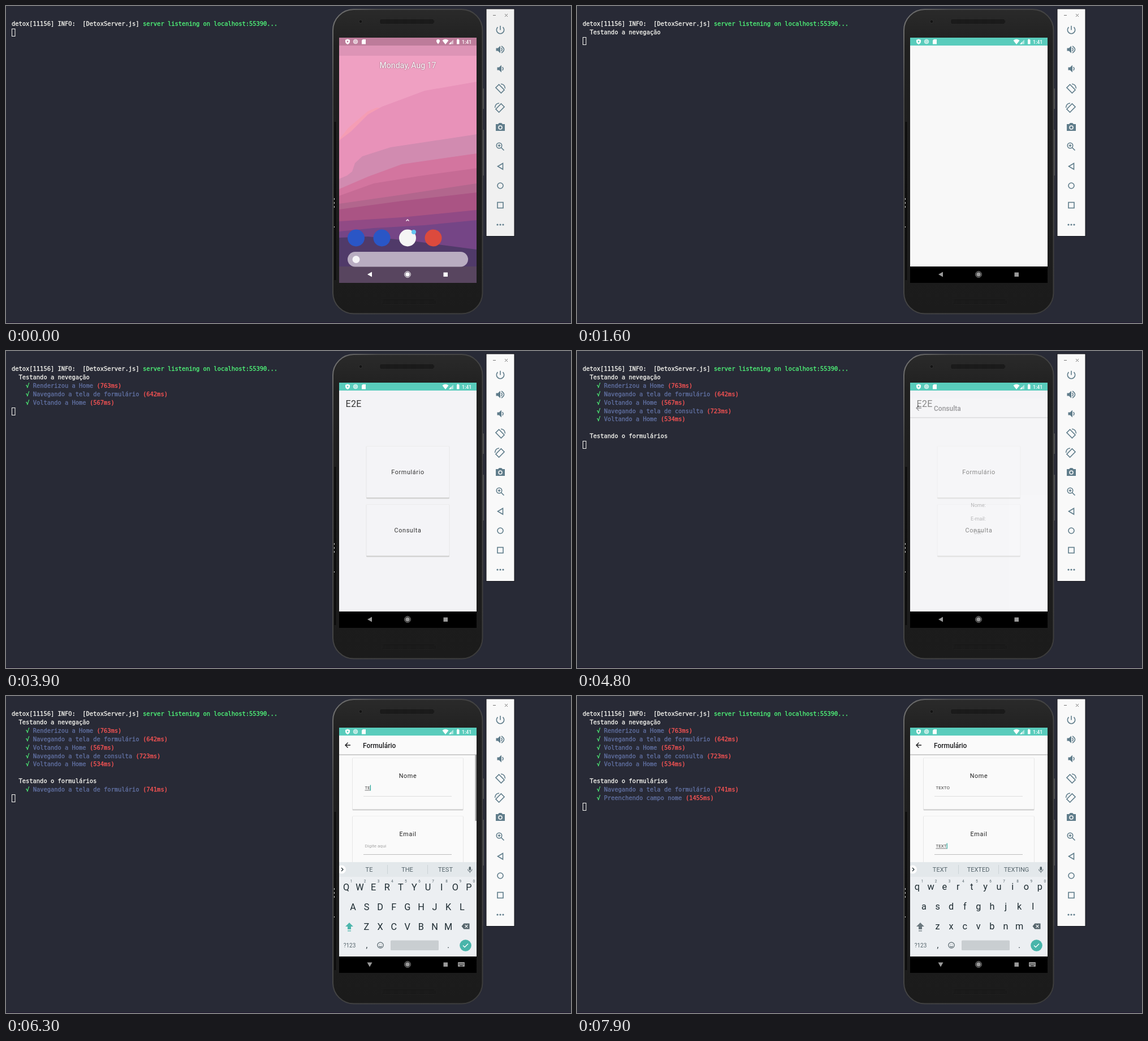
Animation, 999 px wide and 561 px high, one loop 8000 ms. Source, as an HTML page:

```html
<!DOCTYPE html>
<html lang="pt">
<head>
<meta charset="utf-8">
<title>Teste de ponta a ponta</title>
<style>
  html, body { margin: 0; width: 100%; height: 100%; overflow: hidden; background: #282a36; }
  svg { display: block; width: 100vw; height: 100vh; font-family: Roboto, sans-serif; }
  text { white-space: pre; }
  .term { font: 10.42px "DejaVu Sans Mono", monospace; stroke-width: .3; }
  .line { fill: none; stroke: #607d8b; stroke-width: 1.6; }
  .solid { fill: #607d8b; }
</style>
</head>
<body>
<svg viewBox="0 0 999 561">
  <defs>
    <linearGradient id="body" x2="0" y2="1">
      <stop stop-color="#2a2a2a"/><stop offset=".12" stop-color="#202020"/><stop offset="1" stop-color="#1b1b1b"/>
    </linearGradient>
    <linearGradient id="rim" x2="1" y2="1">
      <stop stop-color="#777"/><stop offset=".15" stop-color="#484848"/><stop offset="1" stop-color="#3c3c3c"/>
    </linearGradient>
    <pattern id="mesh" width="2" height="2" patternUnits="userSpaceOnUse">
      <rect width="2" height="2" fill="#2b2b2b"/><rect width="1.4" height="1.4" fill="#080808"/>
    </pattern>
    <clipPath id="screenClip"><rect x="589" y="56" width="243" height="434"/></clipPath>
    <clipPath id="appClip"><rect x="589" y="70" width="243" height="391"/></clipPath>
  </defs>
  <rect width="999" height="561" fill="#282a36"/>
  <rect y="560" width="999" height="1" fill="#211830"/>

  <path d="M844 146v36M844 219v81M842.500 300v106" stroke="#555" stroke-width="2"/>
  <rect x="578" y="6" width="264.500" height="538.500" rx="37" fill="url(#body)" stroke="url(#rim)" stroke-width="2"/>
  <path d="M582 205v280" stroke="#0c0c0c" stroke-width="3"/>
  <path d="M580.500 340v3m0 4v3m0 4v3m0 33v2" stroke="#ddd"/>
  <rect x="661" y="23.500" width="96" height="8" rx="4" fill="url(#mesh)"/>
  <rect x="665" y="520" width="94" height="8" rx="3" fill="url(#mesh)"/>
  <circle cx="627" cy="27.500" r="3" fill="#141414" stroke="#333"/>

  <g id="view"></g>
</svg>
<script>
const LOOP = 8000;
const view = document.getElementById('view');

// Drawing helpers
const rect = (x, y, w, h, fill, extra = '') =>
  `<rect x="${x}" y="${y}" width="${w}" height="${h}" fill="${fill}" ${extra}/>`;
const disc = (x, y, r, fill, extra = '') =>
  `<circle cx="${x}" cy="${y}" r="${r}" fill="${fill}" ${extra}/>`;
const path = (d, extra) => `<path d="${d}" ${extra}/>`;
const stroke = (color, width = 1) => `fill="none" stroke="${color}" stroke-width="${width}"`;
const label = (x, y, size, fill, text, extra = '') =>
  `<text x="${x}" y="${y + size * .355}" font-size="${size}" fill="${fill}" ${extra}>${text}</text>`;
const centered = (x, y, size, fill, text, extra = '') =>
  label(x, y, size, fill, text, 'text-anchor="middle" ' + extra);
const at = (steps, t) => steps.filter(s => s[0] <= t).pop();

// Terminal
const log = [
  [1500, 'Testando a nevegação'],
  [2400, 'Renderizou a Home', 763],
  [3000, 'Navegando a tela de formulário', 642],
  [3800, 'Voltando a Home', 567],
  [4200, 'Navegando a tela de consulta', 723],
  [4800, 'Voltando a Home', 534],
  [4800, ''],
  [4800, 'Testando o formulários'],
  [5600, 'Navegando a tela de formulário', 741],
  [7000, 'Preenchendo campo nome', 1455]
];
const cell = (col, row, fill, text) =>
  `<text class="term" x="${10 + col * 6.272}" y="${35 + row * 14.9}" fill="${fill}" stroke="${fill}">${text}</text>`;

function terminal(t) {
  const shown = log.filter(l => l[0] <= t);
  const rows = shown.map(([, text, ms], i) => ms
    ? cell(4, i + 1, '#50fa7b', '√') + cell(6, i + 1, '#6272a4', text)
      + cell(7 + text.length, i + 1, '#ff5555', `(${ms}ms)`)
    : cell(2, i + 1, '#f8f8f2', text));
  return cell(0, 0, '#f8f8f2', 'detox[11156] INFO:  [DetoxServer.js]')
    + cell(37, 0, '#50fa7b', 'server listening on localhost:55390...') + rows.join('')
    + rect(10.5, 40.5 + Math.round(shown.length * 14.9), 5.5, 13, 'none', 'stroke="#f8f8f2"');
}

// Emulator toolbar
const rotated = y => `<rect x="-4" y="-6.700" width="8" height="13.400" class="line"
  transform="translate(873.500 ${y + .5}) rotate(-45)"/><path class="line" d="M875 ${y - 8}q7 .5 7.500 8"/>`;
const speaker = (x, y) => `<path class="solid" d="M${x} ${y - 2.5}h3.300l4.200-4v13l-4.200-4h-3.300z"/>
  <path class="line" d="M${x + 9} ${y - 3}q3 3 0 6"/>`;
const tools = `
  <path d="M861 16.500h5M882 14l5 5m0-5l-5 5" stroke="#777"/>
  <path class="line" d="M874 35v7.500M869.500 37.300a6.700 6.700 0 1 0 9 0"/>
  ${speaker(866.5, 77)}<path class="line" d="M876 71q9 6 0 12"/>${speaker(868.5, 111)}
  ${rotated(146)}<g transform="matrix(-1 0 0 1 1747 0)">${rotated(180)}</g>
  <path class="solid" d="M866 209h4l2-2h4l2 2h4v12h-16z"/>
  <circle cx="874" cy="215" r="3" fill="none" stroke="#f5f5f5" stroke-width="1.500"/>
  <path class="line" d="M875.500 250.500l5 5M869.700 247h4.600m-2.300-2.300v4.600"/><circle class="line" cx="872" cy="247" r="4.700"/>
  <path class="line" d="M878.500 278.500v10.500l-9-5.250z"/><circle class="line" cx="874" cy="318" r="5"/>
  <rect class="line" x="869" y="347.500" width="10" height="10"/>
  ${[869, 874, 879].map(x => disc(x, 387, 1.6, '#607d8b')).join('')}`;
const toolbar = t => rect(848.5, 4.5, 51, 403.5, '#14151b')
  + rect(849.5, 5.5, 49, 401.5, t < 500 ? '#f0f0f0' : '#f9f9f9') + tools;

// Launcher
const band = (fill, points) => path(`M589 490L${points}L832 490z`, `fill="${fill}"`);
const apps = [[619, '#2a56c6'], [664.5, '#2a56c6'], [710, '#f5f5f5'], [755.5, '#dc4a3d']];
const launcher = rect(589, 56, 243, 434, '#efa0c2') + rect(589, 56, 243, 32, '#dd94b6')
  + rect(589, 56, 243, 14, '#bd7c9a')
  + band('#f59db4', '589 236 605 216 640 186 655 180 832 180')
  + band('#e892b9', '589 238 610 222 640 192 665 178 700 165 740 150 832 134')
  + band('#d18bb0', '589 306 603 300 612 293 617 278 630 266 680 250 740 241 832 227')
  + band('#d3759f', '589 324 640 302 700 280 832 261')
  + band('#c66b95', '589 336 650 314 730 301 832 287')
  + band('#b2668d', '589 350 700 334 832 314')
  + band('#aa5484', '589 360 700 345 832 330')
  + band('#914a85', '589 381 700 374 832 361')
  + band('#754586', '589 399 650 393 740 388 832 379')
  + band('#503a69', '589 410 640 408 720 416 832 431')
  + rect(589, 461, 243, 29, '#58455f')
  + centered(710.5, 105, 14.1, '#fff', 'Monday, Aug 17', 'style="text-shadow:0 0 2px #0008"')
  + path('M707.500 380.500l2.500-2.500 2.500 2.500', stroke('#fff', 1.3))
  + apps.map(([x, fill]) => disc(x, 410.5, 15, fill)).join('') + disc(721, 400, 4, '#66c5f1')
  + rect(604, 435, 213, 26.5, '#b9adc1', 'rx="13.25"') + disc(619, 448.5, 6.5, '#f6f4f7');

// App screens
const card = (x, y, w, h, fill) => rect(x, y + 1, w, h + 1.5, '#cfcfcf', 'rx="1.5"')
  + rect(x - .5, y - .5, w + 1, h + 1, '#e6e6e6', 'rx="1.5"') + rect(x + .5, y, w - 1, h, fill, 'rx="1"');
const spaced = 'letter-spacing=".65"';
const page = fill => rect(589, 70, 243, 391, fill);
const blank = page('#f8f8f8');
const home = page('#f3f3f6') + label(600.5, 93, 16, '#333', 'E2E', 'letter-spacing=".3"')
  + [['Formulário', 169], ['Consulta', 272]].map(([name, y]) =>
    card(637, y, 147, 90, '#f4f4f7') + centered(710.5, y + 45, 10.8, '#333', name, spaced)).join('');
const header = title => page('#fafafa') + rect(589, 103, 243, 2, '#cdcdcd')
  + path('M609 87h-9m4.500-4.500l-4.500 4.500 4.500 4.500', stroke('#1c1c1e', 1.4))
  + label(631, 87.5, 12, '#1c1c1e', title, 'font-weight="500"');
const consulta = header('Consulta') + ['Nome:', 'E-mail:', 'Cor:'].map((name, i) =>
  centered(709.5, 259 + i * 24, 9, '#666', name)).join('');

const advance = { T: .597, E: .568, X: .627, O: .688 };
const textWidth = s => [...s].reduce((sum, c) => sum + advance[c] * 8, 0);

function form(values = [], focus = -1) {
  return header('Formulário') + ['Nome', 'Email', 'Cor'].map((name, i) => {
    const y = 110 + i * 103, value = values[i] || '', end = 634.5 + textWidth(value);
    let out = card(612.5, y, 196, 90, '#fafafa') + centered(710.5, y + 31.5, 10.8, '#222', name, spaced)
      + rect(632, y + 67, 156, 1, i ? '#bdbdbd' : '#dedede')
      + label(634.5, y + 52.5, 8, value ? '#444' : '#a6a6a6', value || 'Digite aqui');
    if (i === focus) {
      if (value) out += rect(634.5, y + 56.5, end - 634.5, .8, '#555');
      out += rect(end, y + 47.5, 1.2, 10, '#26a69a');
    }
    return out;
  }).join('');
}

// Keyboard
const suggestions = {
  T: ['T', 'THE', 'TO'], TE: ['TE', 'THE', 'TEST'], TEX: ['TEX', 'TEXT', 'TEXAS'],
  TEXT: ['TEXT', 'TEXTED', 'TEXTING'], TEXTO: ['TEXTO', 'TEXT', 'TEXTS']
};
const keyRows = [['QWERTYUIOP', 601.5, 338], ['ASDFGHJKL', 613.5, 373], ['ZXCVBNM', 637.5, 408]];

function keyboard(word, upper) {
  const ink = '#1d2b31', soft = '#55646b', shift = upper ? '#4db6ac' : '#6b787e';
  const keys = keyRows.map(([letters, x, y]) => [...letters].map((c, i) =>
    centered(x + i * 24.1, upper ? y : y - 1, 16.3, ink, upper ? c : c.toLowerCase())).join('')).join('');
  const digits = [...'1234567890'].map((d, i) => centered(610.5 + i * 24.1, 328, 6.5, soft, d)).join('');
  const words = (suggestions[word] || []).map((w, i) => centered(642 + i * 67.5, 307, 11, soft, w)).join('');
  return rect(589, 294, 243, 167, '#eceff2') + rect(589, 294, 243, 26, '#e3e8eb')
    + disc(593.5, 307, 7.5, '#fff') + path('M593 304l3 3-3 3', stroke(ink, 1.3))
    + path('M674.500 299v16M745.500 299v16', stroke('#cbd2d6')) + words
    + rect(818.5, 302, 3.5, 6.5, soft, 'rx="1.7"') + path('M816.500 306.500q0 4 3.750 4t3.750-4m-3.750 4v2.500', stroke(soft))
    + keys + digits
    + path('M607 401l7 7h-4v5h-6v-5h-4z', `fill="${shift}"`) + rect(604, 415, 6, 1.3, shift)
    + path('M805.500 407.500l4-5h10v10h-10z', `fill="${soft}"`)
    + path('M811.500 405l5 5m0-5l-5 5', stroke('#eceff2', 1.2))
    + centered(607.5, 441, 10, soft, '?123') + centered(638, 441, 14, ink, ',') + centered(782, 441, 14, ink, '.')
    + disc(662, 441, 5.2, 'none', `stroke="${soft}" stroke-width="1.2"`)
    + path('M659.500 442.500q2.500 3 5 0M660 439.500h.8m2.400 0h.8', stroke(soft, 1.2))
    + rect(680, 432.5, 85, 17.5, '#c9ced1', 'rx="1.5"')
    + disc(812.5, 441.5, 10.3, '#48b5aa') + path('M808 441.500l3 3 6-6', stroke('#fff', 1.3));
}

// System bars
function statusBar(t) {
  const fill = t < 1200 ? '#757575' : '#59ccbc';
  return (t < 500 ? '' : rect(589, 56, 243, 14, fill))
    + path('M604 58.500l4 1.500v3q0 3-4 5-4-2-4-5v-3z', 'fill="#fff"') + disc(604, 63, 1.4, t < 500 ? '#bd7c9a' : fill)
    + disc(618, 63, 3.8, '#fff8', 'stroke="#fffa"')
    + path('M631 59h5v8.500h-7v-6.500z', 'fill="#fff"')
    + (t < 800 ? path('M764 67.500q-3-4-3-5.500a3 3 0 0 1 6 0q0 1.500-3 5.500z', 'fill="#fff"') : '')
    + path('M771.500 61q5.500-4.500 11 0l-5.500 7z', 'fill="#fff"')
    + path('M791 59.500v8h-8z', 'fill="#fff8"') + path('M787 63.500v4h-4z', 'fill="#fff"')
    + path('M797 59.500h1v-1h2v1h1.500v8h-4.500z', 'fill="#fff"')
    + label(806, 63.5, 8.8, '#fff', '1:41', 'font-weight="500"');
}

function navBar(t) {
  const ink = t < 500 ? '#fff' : '#9a9a9a', typing = t >= 5700;
  return (t < 500 ? '' : rect(589, 461, 243, 29, '#000'))
    + path(typing ? 'M638.500 471.500h9l-4.500 8z' : 'M647 470.500v9l-8-4.500z', `fill="${ink}"`)
    + disc(710, 475, 3.8, ink) + disc(710, 475, 5.3, 'none', `stroke="${ink}"`)
    + rect(773.5, 471.5, 7.5, 7.5, ink)
    + (typing ? rect(799, 471, 12, 8, ink, 'rx="1"')
      + path('M800.500 473.500h9m-9 2h9', 'stroke="#000" stroke-dasharray="1 1"') + rect(802.5, 477, 5, 1, '#000') : '');
}

// Timeline: start, base screen, optional screen fading in or out above it
const scenes = [
  [500, blank], [1200, home], [1600, blank], [2000, home],
  [2700, home, form()], [2800, form()], [3600, home, form()], [3700, home],
  [4000, home, consulta], [4100, consulta], [4800, home, consulta], [4900, home],
  [5200, home, form()], [5300, form()]
];
const typing = [
  [5700, 0, ''], [6200, 0, 'T'], [6300, 0, 'TE'], [6400, 0, 'TEX'], [6600, 0, 'TEXT'], [6700, 0, 'TEXTO'],
  [7000, 1, ''], [7400, 1, 'T'], [7500, 1, 'TE'], [7700, 1, 'TEX'], [7900, 1, 'TEXT']
];

function app(t) {
  if (t >= 5700) {
    const [, field, word] = at(typing, t);
    return form(field ? ['TEXTO', word] : [word], field)
      + (t >= 5900 && t < 6800 ? rect(829.5, 104, 2.5, 117, '#9c9c9c') : '')
      + (t >= 5900 ? keyboard(word, t < 7400) : '');
  }
  const [, base, above] = at(scenes, t);
  return base + (above ? `<g opacity=".42" transform="translate(0 14)">${above}</g>` : '');
}

const phone = t => `<g clip-path="url(#screenClip)">`
  + (t < 500 ? launcher : `<g clip-path="url(#appClip)">${app(t)}</g>`) + statusBar(t) + navBar(t) + '</g>';

let last = -1;
function tick(now) {
  const t = Math.floor(now % LOOP / 100) * 100;
  if (t !== last) view.innerHTML = terminal(t) + toolbar(t) + phone(t);
  last = t;
  requestAnimationFrame(tick);
}
tick(0);
</script>
</body>
</html>
```
